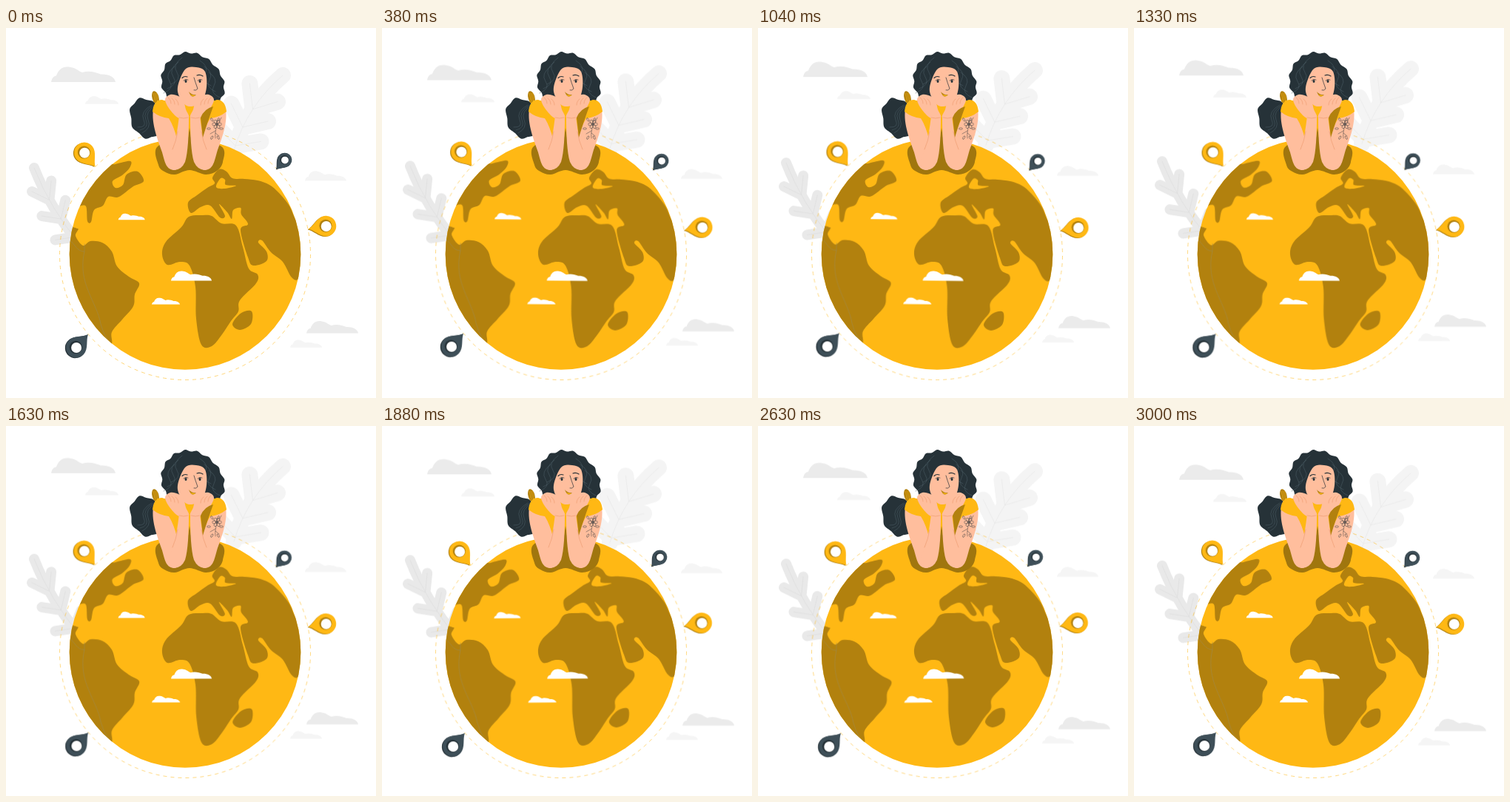
These frames come from a looping animation (500 px wide and 500 px high, 3.04 s). An HTML page:

```html
<!DOCTYPE html>
<html lang="en">
<head>
<meta charset="utf-8">
<title>Dreaming of the world</title>
<style>
  html, body { margin: 0; width: 100%; height: 100%; overflow: hidden; background: #fff; }
  svg { display: block; width: 100vw; height: 100vh; }
  .spin { transform-origin: 242px 306px; }
  .line { fill: none; stroke-linecap: round; stroke-linejoin: round; }
</style>
</head>
<body>
<svg viewBox="0 0 500 500">
  <defs>
    <path id="cloud" d="M0 0C1 -6 4 -8 7 -8.5C10 -17 16 -22 26 -20C34 -19 37 -14.5 42 -13C51 -16 61 -13 67 -10.5C77 -11 86 -7 87 0Z"/>
    <path id="drop" d="M0 0C-3 -8 -13.8 -14 -13.8 -24A13.8 13.8 0 0 1 13.8 -24C13.8 -14 3 -8 0 0Z"/>
    <clipPath id="disc"><circle cx="242" cy="305.5" r="156.3"/></clipPath>
  </defs>
  <g class="float" id="sky"></g>
  <g class="spin">
    <circle cx="242" cy="306" r="169.5" fill="none" stroke="#ffb814" stroke-opacity=".8" stroke-width=".7" stroke-dasharray="5" pathLength="1060"/>
  </g>
  <circle cx="242" cy="305.5" r="156.3" fill="#ffb814"/>
  <g clip-path="url(#disc)"><g class="spin" id="land"></g></g>
  <g class="spin" id="pins"></g>
  <g id="woman"></g>
</svg>
<script>
const GOLD = '#ffb814', BROWN = '#b2810e', SHADE = '#a0760e';
const HAIR = '#263238', SLATE = '#3e4f58', SKIN = '#ffbe9d', BLUSH = '#eb996e';
const LOOP = 3040;
const layer = id => document.getElementById(id);
const { cos, sin, PI } = Math;

function add(parent, tag, attrs) {
  const el = document.createElementNS('http://www.w3.org/2000/svg', tag);
  for (const key in attrs) el.setAttribute(key, attrs[key]);
  parent.append(el);
  return el;
}

const shape = (parent, fill, d) => add(parent, 'path', { d, fill });
const line = (parent, stroke, width, d) =>
  add(parent, 'path', { d, stroke, 'stroke-width': width, class: 'line' });
const oval = (parent, fill, cx, cy, rx, ry = rx, turn = 0) =>
  add(parent, 'ellipse', { fill, cx, cy, rx, ry, transform: `rotate(${turn} ${cx} ${cy})` });

// Smooth closed outline through a ring of points.
function smooth(parent, fill, points) {
  const at = i => points[(i + points.length) % points.length];
  const handle = (from, a, b) => from.map((v, k) => v + (b[k] - a[k]) / 6);
  const d = points.map((p, i) => {
    const next = at(i + 1);
    return 'C' + [handle(p, at(i - 1), next), handle(next, at(i + 2), p), next].join(' ');
  });
  return shape(parent, fill, 'M' + points[0] + d.join('') + 'Z');
}

const blob = (parent, fill, text) =>
  smooth(parent, fill, text.split(' ').map(s => s.split(',').map(Number)));

// Egg-shaped mass of hair with evenly spaced curls on its edge.
function curls(parent, cx, cy, rx, ry, count, lean, widen) {
  const points = Array.from({ length: count * 2 }, (_, i) => {
    const a = i * PI / count, bump = i % 2 ? -1.3 : 1.3;
    return [cx + lean * sin(a) + (rx + bump) * cos(a) * (1 + widen * sin(a)), cy + (ry + bump) * sin(a)];
  });
  smooth(parent, HAIR, points);
}

function cloud(parent, fill, x, y, width) {
  add(parent, 'use', { href: '#cloud', fill, transform: `translate(${x} ${y}) scale(${width / 87})` });
}

// Lobed leaf: a curved stem with pairs of rounded lobes that close towards the tip.
function leaf(parent, fill, vein, [bx, by], [mx, my], [tx, ty], width, reach, spots) {
  const mix = (a, m, b, t) => (1 - t) ** 2 * a + 2 * t * (1 - t) * m + t * t * b;
  const slope = (a, m, b, t) => (1 - t) * (m - a) + t * (b - m);
  let d = `M${bx} ${by}Q${mx} ${my} ${tx} ${ty}`;
  for (const t of spots) {
    const x = mix(bx, mx, tx, t), y = mix(by, my, ty, t);
    const along = Math.atan2(slope(by, my, ty, t), slope(bx, mx, tx, t));
    for (const side of [-1, 1]) {
      const a = along + side * (65 - 50 * t) * PI / 180;
      d += `M${x} ${y}L${x + reach * cos(a)} ${y + reach * sin(a)}`;
    }
  }
  line(parent, fill, width, d);
  line(parent, vein, .7, d);
}

// Map pin with its point at (x, y), a darker edge and a bevelled hole.
function pin(x, y, angle, scale, front, back) {
  const g = layer('pins'), rad = angle * PI / 180;
  const cx = x + 24 * scale * sin(rad), cy = y - 24 * scale * cos(rad);
  const drop = (fill, dx, dy) => add(g, 'use', {
    href: '#drop', fill, transform: `translate(${x + dx} ${y + dy}) rotate(${angle}) scale(${scale})` });
  drop(back, -1.2 * scale, .6 * scale);
  drop(front, 0, 0);
  oval(g, back, cx - .5 * scale, cy - .4 * scale, 8.6 * scale);
  oval(g, '#fff', cx + .3 * scale, cy + .3 * scale, 7 * scale);
}

function drawSky() {
  const g = layer('sky');
  cloud(g, '#ebebeb', 61, 73, 87);
  cloud(g, '#f5f5f5', 107, 102.7, 45);
  cloud(g, '#f5f5f5', 404, 206.5, 56);
  cloud(g, '#ebebeb', 406, 412.5, 70);
  cloud(g, '#f5f5f5', 384, 431.7, 43);
  leaf(g, '#f4f4f4', '#e8e8e8', [308, 165], [326, 105], [374, 64], 22, 35, [.05, .27, .5]);
  leaf(g, '#e9e9e9', '#dedede', [100, 292], [60, 245], [38, 189], 14, 26, [.1, .35, .6]);
}

function drawLand() {
  const g = layer('land');
  const land = points => blob(g, BROWN, points);
  // The Americas
  land('125,190 148,184 168,180 167,189 157,199 144,207 148,216 158,212 163,198 178,194 186,207 172,214 159,224 150,229 138,228 131,240 119,246 115,262 110,261 108,241 98,242 92,253 76,256');
  land('76,279 97,271 94,281 104,294 114,288 130,290 143,302 150,322 166,336 180,345 174,360 172,376 157,394 143,411 141,430 110,440 70,370');
  line(g, '#a08a4c', .6, 'M86 287C94 292 95 302 106 302C96 345 123 370 128 400Q133 418 142 427M106 302V292');
  // Europe and Asia
  land('246,236 258,226 272,216 282,210 279,202 288,191 298,194 306,203 322,204 340,206 356,212 368,222 382,239 390,256 402,280 406,310 396,338 386,337 374,316 358,303 346,287 341,290 352,302 352,315 334,321 327,310 317,273 327,265 318,252 317,243 307,246 305,258 299,249 288,238 296,254 289,256 276,240 263,242 250,250');
  blob(g, GOLD, '284,215 290,203 296,205 297,212 311,213 296,217');
  // Africa and Madagascar
  land('237,269 247,255 266,253 278,254 291,264 311,267 320,296 328,325 340,333 338,345 316,368 314,383 304,396 292,414 278,430 264,428 257,393 256,350 248,321 235,316 218,320 211,306 216,289');
  land('332,383 318,385 306,400 316,408 331,400');
  cloud(g, '#fff', 151.7, 259.2, 36);
  cloud(g, '#fff', 223, 341.5, 55);
  cloud(g, '#fff', 197, 373.6, 38);
}

function drawPins() {
  pin(120.7, 187.3, -38, 1, GOLD, BROWN);
  pin(408.8, 271.8, 80, 1, GOLD, BROWN);
  pin(365.7, 191, 41, .7, SLATE, HAIR);
  pin(111, 414, 222.4, 1, SLATE, HAIR);
}

function drawHair(g) {
  curls(g, 189, 122, 21, 27, 7, 4, 0);
  curls(g, 252, 72, 42, 39, 15, 6, .1);
  oval(g, BROWN, 202, 94, 4.5, 9, -15);
  for (let i = 0; i < 3; i++) {
    line(g, GOLD, .5, `M${199 + 2.2 * i} 88q3 6 1 12`);
    line(g, '#4f6069', .5, `M${197 + 3 * i} 104q-16 9 -11 20t-8 ${10 + 4 * i}`);
    line(g, '#4f6069', .5, `M${238 - 5 * i} ${40 + 6 * i}q-14 10 -7 20t-8 16`);
    line(g, '#4f6069', .5, `M${262 + 6 * i} ${44 + 8 * i}q13 8 7 18t8 16`);
  }
}

function drawFace(g) {
  blob(g, SKIN, '242,56 257,53 269,59 271,80 264,100 247,106 236,96 232,80');
  for (const x of [243, 262]) {
    oval(g, HAIR, x, 72, 1.5, 2);
    line(g, HAIR, .7, `M${x - 3} 71q3 -3 6 -1`);
  }
  line(g, HAIR, 1.2, 'M238 67.5q3 -3 7 -1.500M258 64q4 -1.500 8 1');
  line(g, HAIR, .7, 'M254 67q2 7 5 15q-2 3 -5 2');
  shape(g, BROWN, 'M247 86Q251 91 257 90Q251 97 247 86Z');
  shape(g, GOLD, 'M249 89.5Q252 91.500 256 91Q252 94 249 89.5Z');
}

// One arm propped on its elbow; the other is its mirror image.
function drawArm(g) {
  shape(g, SKIN, 'M199 110C196 130 206 153 211 168C215 183 217 192 228 192C238 190 238 173 233 151L222 123Z');
  shape(g, GOLD, 'M198 113C199 103 203 97 211 97Q225 101 236 121L231 150Q227 133 220 122Q208 121 198 113Z');
  shape(g, SKIN, 'M234 119H247C247 145 246 168 242 181Q237 192 227 192C218 189 220 174 226 163C230 150 232 135 234 119Z');
  blob(g, SKIN, '215,97 222,90 233,92 240,99 243,110 247,121 234,122 222,111');
  line(g, BLUSH, .6, 'M232 140Q230 153 225 164M234 121Q240 123 246 121');
  for (let i = 0; i < 3; i++)
    line(g, BLUSH, .6, `M${219 + 5 * i} ${94 + i}q4 3 4 8`);
}

function drawTattoo(g) {
  const ink = (x, y, rx, ry, turn) => {
    const el = oval(g, 'none', x, y, rx, ry, turn);
    el.setAttribute('stroke', HAIR);
    el.setAttribute('stroke-width', .45);
  };
  for (let i = 0; i < 6; i++) {
    const a = i * PI / 3, x = cos(a), y = sin(a);
    ink(285 + 3.5 * x, 130 + 3.5 * y, 2.8, 2, i * 60);
    ink(282.5 + 8.5 * x, 136 + 14 * y, 2.5, 1.2, i * 60);
  }
  ink(285, 130, 1.5, 1.5, 0);
  line(g, HAIR, .45, 'M284 135Q282 145 283 149M283 139L276 143M283 142L288 146M288 127L291 121');
}

function drawWoman() {
  const g = layer('woman');
  blob(g, SHADE, '205,160 206,185 214,194 228,198 248,192 270,198 285,193 293,181 291,160 248,148');
  drawHair(g);
  shape(g, GOLD, 'M204 98H290L283 164L250 174L215 164Z');
  shape(g, SHADE, 'M248 135L241 181H255Z');
  drawFace(g);
  drawArm(g);
  drawArm(add(g, 'g', { transform: 'translate(496 0) scale(-1 1)' }));
  shape(g, BROWN, 'M280 106Q268 109 263 121L266 148Q271 131 280 106Z');
  drawTattoo(g);
}

function loop(selector, steps) {
  const frames = steps.map(([offset, transform]) => ({ offset, transform }));
  for (const el of document.querySelectorAll(selector))
    el.animate(frames, { duration: LOOP, iterations: Infinity });
}

drawSky();
drawLand();
drawPins();
drawWoman();
loop('.spin', [[0, 'rotate(0deg)'], [.25, 'rotate(1deg)'], [.75, 'rotate(-1deg)'], [1, 'rotate(0deg)']]);
loop('.float', [[0, 'translateY(0px)'], [.5, 'translateY(-10px)'], [1, 'translateY(0px)']]);
</script>
</body>
</html>
```
